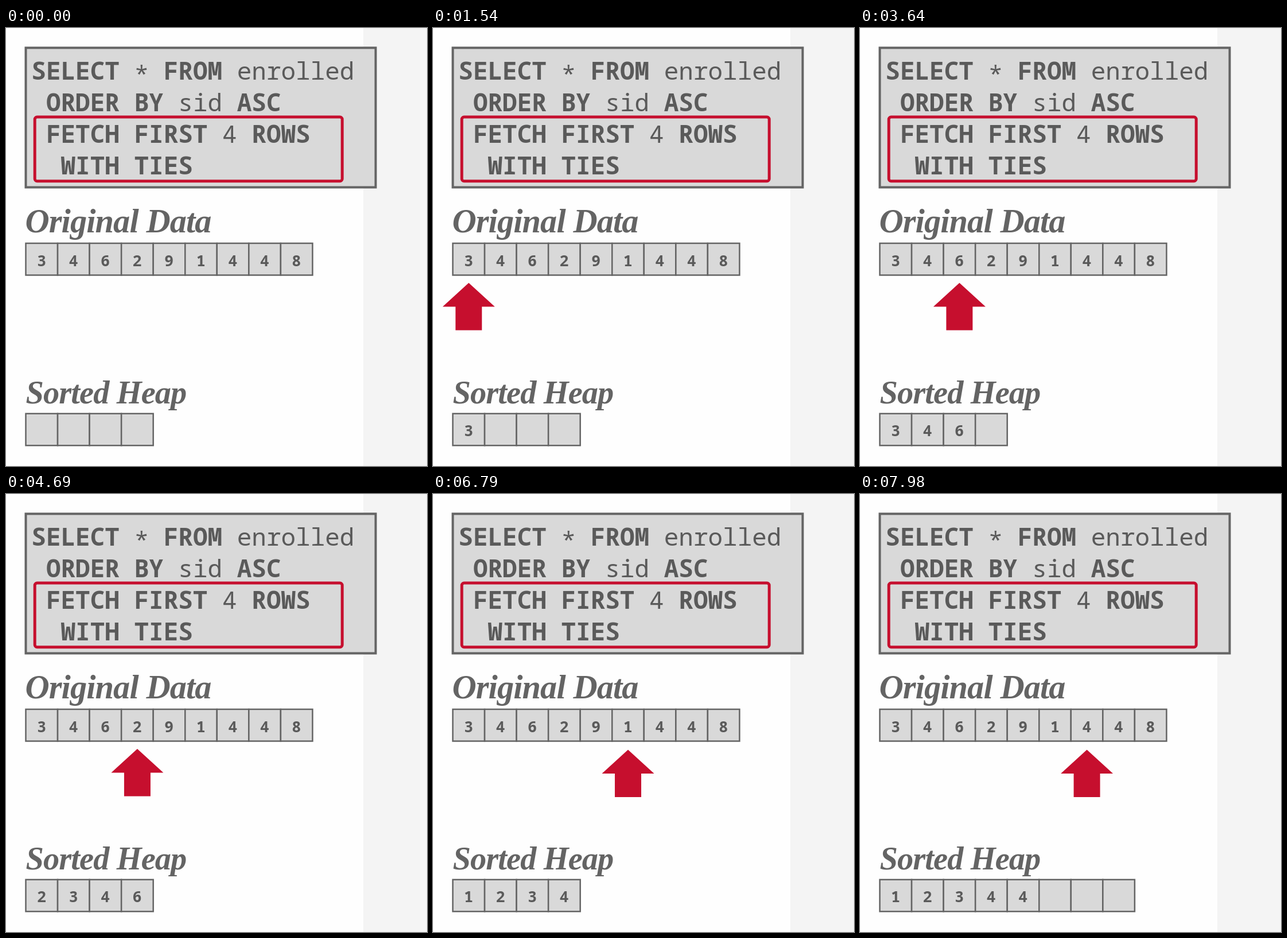
Recreate the animation shown at these times as an HTML page with a canvas. Size 734x763 px, loop 8000 ms.

```html
<!DOCTYPE html>
<html lang="en">
<head>
<meta charset="utf-8">
<title>Top-N heap sort with ties</title>
<style>
  html, body { margin: 0; width: 100%; height: 100%; overflow: hidden; background: #fefefe; }
  canvas { display: block; }
</style>
</head>
<body>
<canvas id="stage" width="734" height="763"></canvas>
<script>
const ctx = document.getElementById('stage').getContext('2d');
const LOOP = 8000;
const GRAY = '#646464', INK = '#5a5a5a', FILL = '#d9d9d9', RED = '#c60f2e';
const MONO = '"Noto Sans Mono", monospace';
const SERIF = '"Liberation Serif", serif';
const LEFT = 34.5, CELL = 55.55;
const CHAR = 25.6, LINE = 55.2;

const data = [3, 4, 6, 2, 9, 1, 4, 4, 8];
const query = [
  // row, column, text, weight
  [0, 0, 'SELECT', 700], [0, 9, 'FROM', 700], [0, 14, 'enrolled', 400],
  [1, 1, 'ORDER BY', 700], [1, 10, 'sid', 400], [1, 14, 'ASC', 700],
  [2, 1, 'FETCH FIRST', 700], [2, 13, '4', 400], [2, 15, 'ROWS', 700],
  [3, 2, 'WITH TIES', 700]
];
const steps = [
  { at: 0, heap: [] },
  { at: 1190, arrow: 0, heap: [3] },
  { at: 2310, arrow: 1, heap: [3, 4] },
  { at: 3640, arrow: 2, heap: [3, 4, 6] },
  { at: 4690, arrow: 3, heap: [2, 3, 4, 6] },
  { at: 5670, arrow: 4, heap: [2, 3, 4, 6], skip: true },
  { at: 6790, arrow: 5, heap: [1, 2, 3, 4] },
  { at: 7840, arrow: 6, heap: [1, 2, 3, 4, 4], size: 8 }
];

function text(str, x, y, font, color, align = 'left', spacing = 0) {
  ctx.font = font;
  ctx.fillStyle = color;
  ctx.textAlign = align;
  ctx.letterSpacing = spacing + 'px';
  ctx.fillText(str, x, y);
}

function heading(str, x, y, size, color) {
  text(str, x, y, `italic 700 ${size}px ${SERIF}`, color, 'left', -0.9);
}

function box(x, y, w, h, line, color, fill, radius = 0) {
  ctx.beginPath();
  ctx.roundRect(x, y, w, h, radius);
  if (fill) {
    ctx.fillStyle = fill;
    ctx.fill();
  }
  ctx.lineWidth = line;
  ctx.strokeStyle = color;
  ctx.stroke();
}

function cells(values, count, y) {
  for (let i = 0; i < count; i++) {
    const x = LEFT + i * CELL;
    box(x, y, CELL, 55.5, 2.5, GRAY, FILL);
    text(values[i] ?? '', x + CELL / 2 - 0.3, y + 39.5, `700 27px ${MONO}`, INK, 'center');
  }
}

function drawQuery() {
  box(34.5, 34.5, 610, 243, 4, GRAY, FILL);
  const put = (row, col, str, weight, dy = 0) =>
    text(str, 44.3 + col * CHAR, 89.8 + row * LINE + dy, `${weight} ${CHAR / 0.6}px ${MONO}`, INK);
  query.forEach(part => put(...part));
  put(0, 7, '*', 400, 5);
  box(50.2, 155, 536, 111.7, 5, RED, null, 4);
}

function drawArrow(index) {
  const x = LEFT + CELL * (index + 0.5);
  const y = index < 5 ? 444 : 445.5;
  ctx.fillStyle = RED;
  ctx.beginPath();
  for (const [dx, dy] of [[0, 0], [45.5, 41.5], [23, 41.5], [23, 82.5], [-23, 82.5], [-23, 41.5], [-45.5, 41.5]])
    ctx.lineTo(x + dx, y + dy);
  ctx.fill();
}

function draw(time) {
  const step = steps.findLast(s => s.at <= time);
  ctx.fillStyle = '#fefefe';
  ctx.fillRect(0, 0, 734, 763);
  ctx.fillStyle = '#f4f4f4';
  ctx.fillRect(623, 0, 111, 763);
  drawQuery();
  heading('Original Data', 33.5, 355.5, 58.4, GRAY);
  cells(data, data.length, 375);
  heading('Sorted Heap', 34.5, 653.5, 56.4, GRAY);
  cells(step.heap, step.size ?? 4, 671.7);
  if ('arrow' in step) drawArrow(step.arrow);
  if (step.skip) heading('Skip!', 244, 587.5, 40, RED);
}

const start = performance.now();
function tick() {
  draw((performance.now() - start) % LOOP);
  requestAnimationFrame(tick);
}
tick();
</script>
</body>
</html>
```
